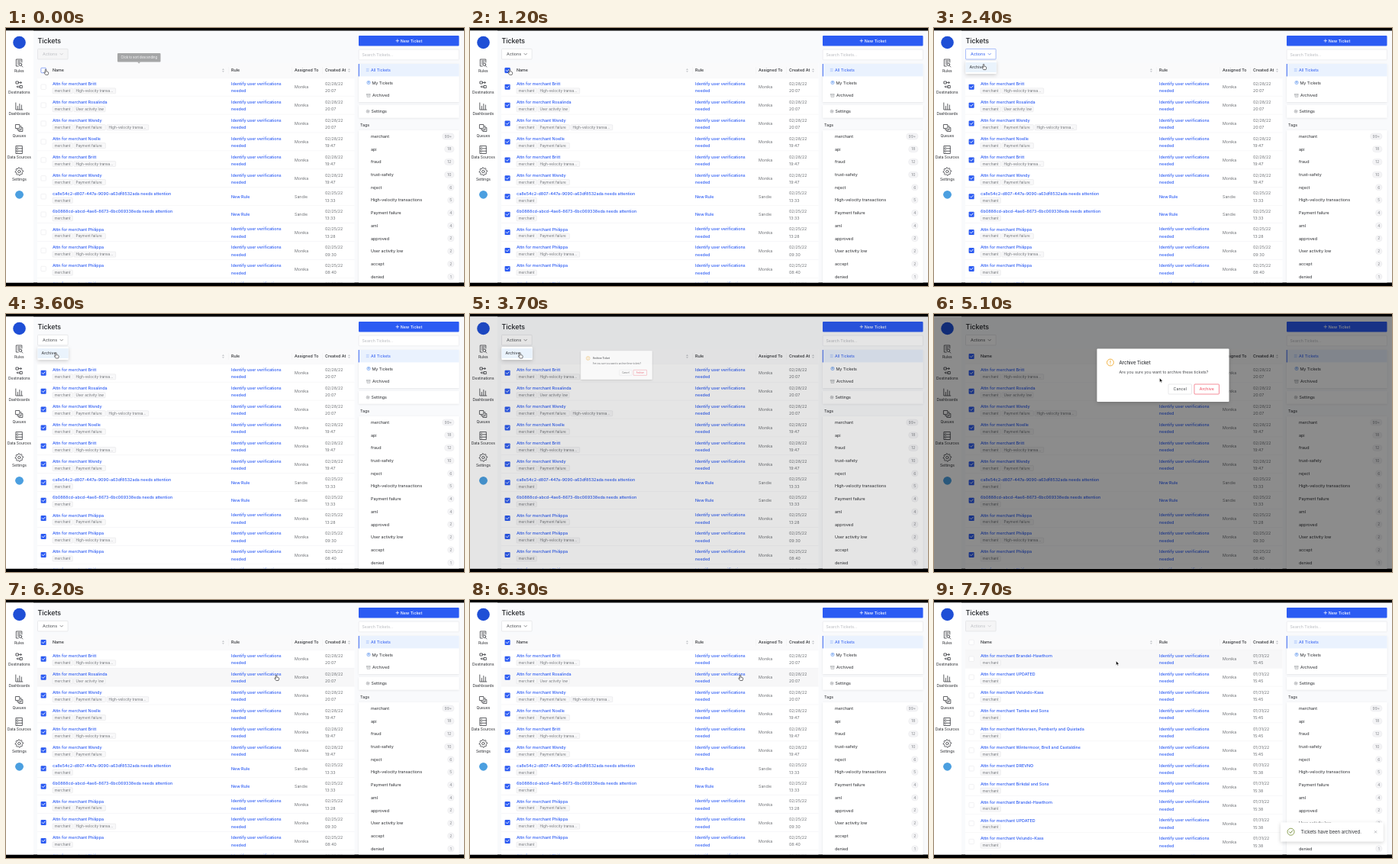
Write an HTML page that moves like this. It is 600 px wide and 338 px high and loops after 7.8 s.

```html
<!DOCTYPE html>
<html lang="en">
<head>
<meta charset="utf-8">
<title>Tickets</title>
<style>
html, body { margin: 0; width: 100%; height: 100%; overflow: hidden; background: #000; }
svg { display: block; width: 100vw; height: 100vh; }
text { font-family: Inter, Roboto, sans-serif; white-space: pre; }
</style>
</head>
<body>
<svg id="stage" viewBox="0 0 600 338" xmlns="http://www.w3.org/2000/svg"></svg>
<script>
const LOOP = 7800, STEP = 100;
const BLUE = '#2b5bf3', INK = '#2a2c30', GREY = '#6f7276', LINE = '#ececef';

// --- drawing helpers (text y is the visual middle of the line) ---
const text = (x, y, s, o = {}) => {
  const { size = 5.4, fill = INK, weight = 400, anchor = 'start' } = o;
  return `<text x="${x}" y="${(y + size * .36).toFixed(2)}" font-size="${size}" fill="${fill}" font-weight="${weight}" text-anchor="${anchor}">${s}</text>`;
};
const rect = (x, y, w, h, fill, extra = '') =>
  `<rect x="${x}" y="${y}" width="${w}" height="${h}" fill="${fill}" ${extra}/>`;
const path = (d, stroke, width = .6, fill = 'none') =>
  `<path d="${d}" stroke="${stroke}" stroke-width="${width}" fill="${fill}" stroke-linecap="round" stroke-linejoin="round"/>`;
const circle = (x, y, r, fill, extra = '') => `<circle cx="${x}" cy="${y}" r="${r}" fill="${fill}" ${extra}/>`;
const group = (id, body, extra = '') => `<g id="${id}" ${extra}>${body}</g>`;
const at = (x, y, body) => `<g transform="translate(${x} ${y})">${body}</g>`;

// --- left navigation ---
const navIcons = [
  ['Rules', 46, 'M3.5 -1V-5H-4V4H-1M-2 -3H2M-2 -1H1M-2 1H-1M4.5 5L3 3.5M3.4 1.8A1.8 1.8 0 1 1 -.2 1.8A1.8 1.8 0 1 1 3.4 1.8'],
  ['Destinations', 74, 'M-4 -4H-1V-1H-4ZM-1 -2.5H3L1.8 -3.8M3 -2.5L1.8 -1.2M1 1.5H4V4.5H1ZM1 3H-3L-1.8 1.8M-3 3L-1.8 4.2'],
  ['Dashboards', 102.5, 'M-4.5 -4.5V4.5H4.5M-2 4V0M.5 4V-3M3 4V-1.5'],
  ['Queues', 131, 'M-4.5 -4.5H.5V.5H-4.5ZM1.5 -2.5H2.5V2.5H-2.5V1.5M3.5 -.5H4.5V4.5H-.5V3.5'],
  ['Data Sources', 159.5, 'M-4 -5H4V5H-4ZM-4 -1.7H4M-4 1.7H4M-2.4 -3.3H-2M-2.4 0H-2M-2.4 3.3H-2'],
  ['Settings', 188, '']
];
function gear() {
  let d = '';
  for (let i = 0; i < 32; i++) {
    const a = i / 32 * Math.PI * 2, r = (i + 1) % 4 < 2 ? 5.2 : 4;
    d += (i ? 'L' : 'M') + (r * Math.cos(a)).toFixed(2) + ' ' + (r * Math.sin(a)).toFixed(2);
  }
  return d + 'ZM1.7 0A1.7 1.7 0 1 1 -1.7 0A1.7 1.7 0 1 1 1.7 0';
}
function sidebar() {
  let s = rect(0, 0, 36, 338, '#fff') + circle(17.5, 19, 8.3, '#1f4fd6');
  for (const [label, y, d] of navIcons)
    s += at(17.3, y, path(d || gear(), '#3a3c40', .8)) +
      text(17.3, y + 10.2, label, { size: 4.9, anchor: 'middle' });
  return s + circle(17.5, 218.3, 5.4, '#4b9fe0');
}

// --- ticket table ---
const M = 'merchant', HV = 'High-velocity transa...', UA = 'User activity low', PF = 'Payment failure';
const chipWidth = { [M]: 26.3, [HV]: 54.8, [UA]: 41.2, [PF]: 41.5 };
const forM = n => 'Attn for merchant ' + n;
const openTickets = [
  [forM('Britt'), [M, HV], '02/28/22', '20:07'],
  [forM('Rosalinda'), [M, UA], '02/28/22', '20:07'],
  [forM('Wendy'), [M, PF, HV], '02/28/22', '20:07'],
  [forM('Noelle'), [M, PF], '02/28/22', '19:47'],
  [forM('Britt'), [M, HV], '02/28/22', '19:47'],
  [forM('Wendy'), [M, PF], '02/28/22', '19:47'],
  ['ca8e54c2-d807-447a-9090-a63df8532ada needs attention', [M], '02/25/22', '13:33', 1],
  ['6b0888cd-abcd-4ae6-8673-6bc069338eda needs attention', [M], '02/25/22', '13:33', 1],
  [forM('Philippa'), [M, PF], '02/25/22', '13:28'],
  [forM('Philippa'), [M, HV], '02/25/22', '09:30'],
  [forM('Philippa'), [M], '02/25/22', '08:40'],
  [forM('Philippa'), [M], '02/25/22', '08:38']
];
const firms = ['Brandel-Hawthorn', 'UPDATED', 'Velundo-Kass', 'Tambe and Sons',
  'Halvorsen, Pemberly and Quistada', 'Wintermoor, Brell and Castaldine', 'DREVNO', 'Birkdal and Sons'];
const olderTickets = Array.from({ length: 12 }, (_, i) =>
  [forM(firms[i < 8 ? i : [0, 1, 2, 3][i - 8]]), [M], '01/31/22', i < 6 ? '15:45' : '15:38']);

const emptyBox = (y, stroke = '#e3e3e6') =>
  rect(45.9, y - 3.2, 6.4, 6.4, '#fff', `rx=".8" stroke="${stroke}" stroke-width=".5"`);
const tickBox = y => rect(45.6, y - 3.5, 7, 7, BLUE, 'rx=".9"') +
  path(`M47.4 ${y}l1.3 1.4l2.3 -2.7`, '#fff', .9);

function rows(list, pitch1) {
  let y = 65.2, s = '', ticks = tickBox(55.5);
  for (const [name, tags, date, time, single] of list) {
    const h = single ? pitch1 : 23.93, l1 = y + 8, l2 = y + 17.1, mid = y + 12;
    const link = { fill: BLUE, weight: 500 }, soft = { size: 5.3, fill: GREY };
    s += emptyBox(mid) + text(61, l1, name, link);
    let x = 61;
    for (const tag of tags) {
      s += rect(x, l2 - 3.5, chipWidth[tag], 7, '#f8f8f9', 'rx=".9" stroke="#dcdcdf" stroke-width=".4"') +
        text(x + 2.5, l2, tag, { size: 4.7, fill: '#707378' });
      x += chipWidth[tag] + 1.6;
    }
    s += single ? text(295, mid - .2, 'New Rule', link)
      : text(295, l1 - .2, 'Identify user verifications', link) + text(295, l2 + .1, 'needed', link);
    s += text(378, mid + .2, single ? 'Sandie' : 'Monika', soft) +
      text(418, l1 - .2, date, soft) + text(418, l2, time, soft) +
      rect(41, y + h - .2, 415.5, .4, LINE);
    ticks += tickBox(mid);
    y += h;
  }
  return [s, ticks];
}
const sorter = x => `<path d="M${x - 1.5} 54.9l1.5 -1.8l1.5 1.8zM${x - 1.5} 56.3l1.5 1.8l1.5 -1.8z" fill="#c4c6ca"/>`;
function header() {
  const o = { weight: 500, size: 5.35 };
  return text(61, 55.5, 'Name', o) + sorter(284.5) + text(295, 55.5, 'Rule', o) +
    text(378, 55.5, 'Assigned To', o) + text(418, 55.5, 'Created At', o) + sorter(449.5) +
    [291.5, 374.5, 414.5].map(x => rect(x, 51, .4, 9, LINE)).join('') +
    rect(41, 65, 415.5, .4, LINE) + emptyBox(55.5);
}

// --- right column ---
const tagList = [['merchant', '99+'], ['api', 18], ['fraud', 12], ['trust-safety', 10], ['reject', 6],
  ['High-velocity transactions', 5], ['Payment failure', 4], ['aml', 4], ['approved', 2],
  ['User activity low', 2], ['accept', 2], ['denied', 1]];
function panel() {
  let s = rect(462, 10, 131.5, 13.5, BLUE, 'rx="1"') +
    path('M511 16.7h3.6M512.8 14.9v3.6', '#fff', .7) +
    text(516.8, 16.7, 'New Ticket', { fill: '#fff', weight: 500, size: 5.3 }) +
    rect(462.2, 28.2, 131.2, 13.6, '#fff', 'rx=".9" stroke="#dedfe3" stroke-width=".5"') +
    text(466.5, 35, 'Search Tickets...', { fill: '#b7b9be', size: 5.2 }) +
    rect(462, 47, 131.5, 50, '#fff', 'filter="url(#soft)"') +
    rect(462, 47, 131.5, 16.4, '#eaf2fe') + rect(461.8, 47, .9, 16.4, BLUE) +
    path('M472.2 53.4h3M472.2 55h3M472.2 56.6h3', '#8fb1fa', .5) +
    text(478, 55, 'All Tickets', { fill: BLUE, size: 5.3 }) +
    circle(475, 71.5, 2.2, '#dcebff', 'stroke="#5b8fe8" stroke-width=".5"') + circle(475, 71, .8, '#4f86e6') +
    text(479.5, 71.6, 'My Tickets', { size: 5.3 }) +
    path('M472.6 86.4h4.6v1.2h-4.6zM473 87.8v2.6h3.8v-2.6M474.2 88.8h1.4', '#85888d', .45) +
    text(480, 88.2, 'Archived', { size: 5.3 }) +
    rect(462, 101, 131.5, 16.5, '#fff', 'filter="url(#soft)"') +
    at(474, 109.2, `<g transform="scale(.4)">${path(gear(), '#85888d', 1.2)}</g>`) +
    text(478.5, 109.2, 'Settings', { size: 5.3 }) +
    text(464, 127.3, 'Tags', { size: 5.3 }) + rect(462, 134, 131.5, 210, '#fff', 'filter="url(#soft)"');
  tagList.forEach(([name, n], i) => {
    const y = 142 + i * 16.71, w = [0, 8.5, 12.5, 15.5][String(n).length];
    s += text(478, y, name) +
      rect(587 - w, y - 4, w, 8, '#f4f4f6', 'rx="4" stroke="#e6e6e9" stroke-width=".4"') +
      text(587 - w / 2, y, n, { size: 4.9, fill: '#85888d', anchor: 'middle' });
  });
  return s;
}

// --- floating parts ---
const button = (x, w, label, color, border) =>
  rect(x, 92, w, 13, '#fff', `rx="1" stroke="${border}" stroke-width=".6"`) +
  text(x + w / 2, 98.5, label, { fill: color, anchor: 'middle', size: 5.3 });
const modal = rect(213.5, 45.5, 173, 69.5, '#fff', 'rx="1" filter="url(#deep)"') +
  circle(231, 63.5, 4.4, 'none', 'stroke="#f0a92b" stroke-width=".9"') +
  path('M231 61.2v2.6M231 65.6v.1', '#f0a92b', .9) +
  text(242.5, 63.5, 'Archive Ticket', { size: 6, weight: 500 }) +
  text(242.5, 75.8, 'Are you sure you want to archive these tickets?', { size: 5.25, fill: '#4a4c50' }) +
  button(307, 30.5, 'Cancel', '#4a4c50', '#dadade') + button(341, 32.5, 'Archive', '#ee4459', '#ee4459');
const toast = rect(454, 291.5, 134.5, 24.8, '#fff', 'rx="1" filter="url(#deep)"') +
  circle(467.5, 303.7, 4.5, 'none', 'stroke="#7d9640" stroke-width=".9"') +
  path('M465.5 303.8l1.5 1.6l2.7 -3.3', '#6c8438', .9) +
  text(480.5, 303.7, 'Tickets have been archived.', { size: 6 }) +
  path('M577.2 302.5l2.6 2.6M579.8 302.5l-2.6 2.6', '#94969a', .6);
const tooltip = rect(146, 33, 56.5, 11.6, '#333', 'rx="1"') +
  '<path d="M172.2 44.5h4l-2 2z" fill="#333"/>' +
  text(174.2, 38.8, 'Click to sort descending', { size: 4.15, fill: '#fff', anchor: 'middle' });
const dropdown = rect(41.5, 43, 40.2, 17, '#fff', 'rx="1" filter="url(#deep)"') +
  rect(41.5, 45, 40.2, 13, '#eaf3fc') + text(46.5, 51.3, 'Archive', { size: 5.3 });
const hand = path('M-.8 .3Q-.8 -.5 0 -.5Q.8 -.5 .8 .3V2.5L2 2.6L2.9 2.9L3.6 3.5V5.3L3 6.8H-.2L-2 4.3Q-2.4 3.4 -1.7 3.2L-.8 3.9Z', '#1d1d1f', .6, '#fff');
const arrow = path('M0 0V5.4L1.3 4.3L2.2 6.2L3.1 5.8L2.2 3.9H3.9Z', '#fff', .5, '#111');

// --- assemble ---
const [openBody, openTicks] = rows(openTickets, 23.4);
const [olderBody] = rows(olderTickets, 23.93);
const stage = document.getElementById('stage');
stage.innerHTML = `<defs>
  <clipPath id="view"><rect x="0" y="3.5" width="600" height="330"/></clipPath>
  <filter id="soft" x="-10%" y="-20%" width="120%" height="150%"><feDropShadow dx="0" dy=".7" stdDeviation="1" flood-color="#000" flood-opacity=".09"/></filter>
  <filter id="deep" x="-20%" y="-40%" width="140%" height="200%"><feDropShadow dx="0" dy="1.6" stdDeviation="2.4" flood-color="#000" flood-opacity=".18"/></filter>
</defs>` + rect(0, 0, 600, 338, '#000') + group('page',
  rect(0, 0, 600, 338, '#f9fafc') + sidebar() +
  text(41.5, 17, 'Tickets', { size: 8.8, weight: 500, fill: '#1f2125' }) +
  '<g id="actions">' + rect(41.5, 27.4, 39.6, 13.6, '#fff', 'id="actBox" rx=".9" stroke-width=".6"') +
  `<g id="actText">${text(48, 34.3, 'Actions', { size: 5.4, fill: 'currentColor' })}${path('M71 33.4l1.7 1.8l1.7 -1.8', 'currentColor', .6)}</g></g>` +
  rect(41, 46, 415.5, 292, '#fff') + rect(41, 46, 415.5, 19.2, '#fafafb') +
  rect(41, 65.4, 415.5, 23.6, '#f7f7f8', 'id="hover"') + header() +
  group('boxHover', emptyBox(55.5, BLUE)) +
  group('open', openBody) + group('older', olderBody) + group('ticks', openTicks) + panel() +
  group('tooltip', tooltip) + rect(0, 0, 600, 338, '#000', 'id="mask"') +
  group('dropdown', dropdown) + group('modal', modal) + group('toast', toast) +
  group('cursor', group('hand', hand) + group('arrow', arrow)), 'clip-path="url(#view)"');

const el = {};
stage.querySelectorAll('[id]').forEach(n => el[n.id] = n);
const set = (id, name, v) => el[id].setAttribute(name, v);
const fade = (id, v) => {
  set(id, 'opacity', v);
  set(id, 'display', v > 0 ? 'inline' : 'none');
};

// --- motion ---
const smooth = p => p * p * (3 - 2 * p);
function track(t, keys, ease = p => p) {
  let a = keys[0];
  for (const b of keys) {
    if (t < b[0]) {
      const p = ease((t - a[0]) / (b[0] - a[0]));
      return a.slice(1).map((v, i) => v + (b[i + 1] - v) * p);
    }
    a = b;
  }
  return a.slice(1);
}
const pointer = [[0, 52, 54.5], [1200, 52, 54.5], [1800, 62, 33], [2100, 63, 37], [2400, 65, 47.8],
  [2800, 65, 47.8], [3100, 65.5, 51.2], [4400, 65.5, 51.2], [5100, 295.5, 84], [5600, 354, 98.7],
  [6700, 354, 98.7], [7400, 352, 78], [7700, 238.5, 80]];
// time, scale, opacity, mask
const zoom = [[0, .2, 0, 0], [3600, .2, 0, 0], [3700, .54, .78, .1], [3800, .9, 1, .34], [3900, .991, 1, .43],
  [4000, 1, 1, .45], [5900, 1, 1, .45], [6000, .85, .7, .3], [6100, .45, .25, .1], [6200, .2, 0, 0]];

const looks = {
  off: ['#f5f5f6', '#dcdce0', '#bcbec3'],
  plain: ['#fff', '#dcdce0', '#4a4c50'],
  blue: ['#fff', '#6f93f7', BLUE]
};
function render(t) {
  const checked = t >= 400 && t < 7000, swapped = t >= 7000;
  fade('open', swapped ? 0 : 1);
  fade('older', swapped ? 1 : 0);
  fade('ticks', checked ? 1 : 0);
  fade('boxHover', t < 1300 ? 1 : 0);
  fade('tooltip', track(t, [[0, .42], [200, 0]])[0]);

  const lit = t >= 1700 && t < 2800 || t >= 3800 && t < 4500;
  const [bg, border, ink] = looks[!checked ? 'off' : lit ? 'blue' : 'plain'];
  set('actBox', 'fill', bg);
  set('actBox', 'stroke', border);
  set('actText', 'color', ink);

  fade('dropdown', track(t, [[0, 0], [1900, 0], [2200, 1], [3700, 1], [3800, 0]])[0]);
  const [s, alpha, dim] = track(t, zoom);
  set('modal', 'transform', `translate(65 51.5) scale(${s}) translate(-65 -51.5)`);
  fade('modal', alpha);
  fade('mask', dim);

  const [slide] = track(t, [[0, 150], [6700, 150], [7000, 0]], p => 1 - (1 - p) ** 3);
  set('toast', 'transform', `translate(${slide} 0)`);
  fade('toast', slide < 150 ? 1 : 0);

  const [x, y] = track(t, pointer, smooth);
  set('cursor', 'transform', `translate(${x} ${y})`);
  const isArrow = t >= 4500 && t < 5500 || t >= 6800;
  fade('arrow', isArrow ? 1 : 0);
  fade('hand', isArrow ? 0 : 1);
  fade('hover', t >= 6200 ? 1 : 0);
  set('hover', 'y', y > 89 ? 89.3 : 65.4);
}

const start = performance.now();
function tick() {
  const t = (performance.now() - start) % LOOP;
  render(Math.floor(t / STEP) * STEP);
  requestAnimationFrame(tick);
}
render(0);
requestAnimationFrame(tick);
</script>
</body>
</html>
```
